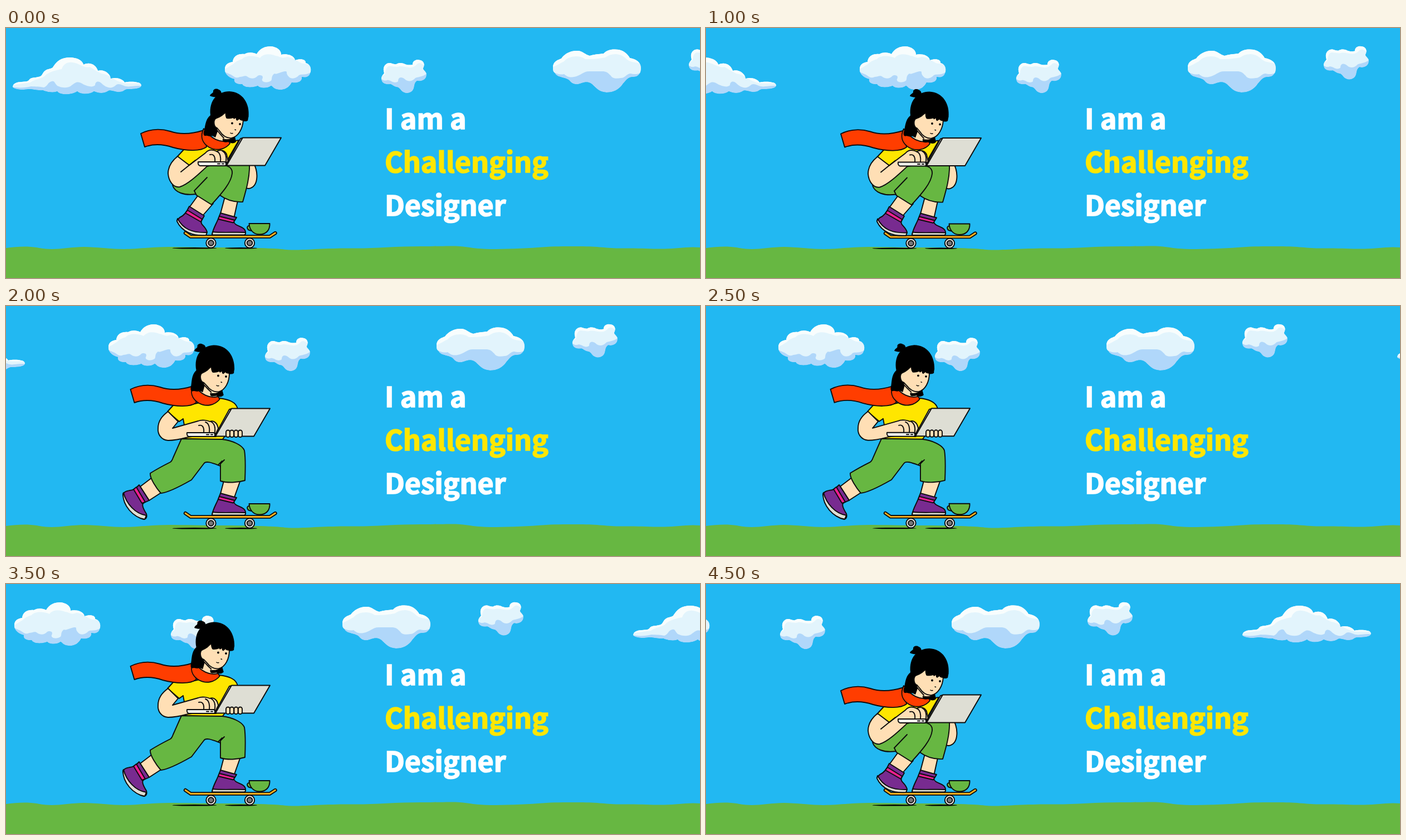
An HTML page that plays this animation: 1246 px wide and 450 px high, repeating every 5000 ms.

```html
<!DOCTYPE html>
<html lang="en">
<head>
<meta charset="utf-8">
<title>Challenging Designer</title>
<style>
  html, body { margin: 0; width: 100%; height: 100%; overflow: hidden; background: #22b8f2; }
  svg { display: block; width: 100%; height: 100%; }
  text {
    font: 700 50px "Noto Sans CJK KR", "Noto Sans CJK JP", "Noto Sans CJK SC", "Noto Sans CJK", sans-serif;
    fill: #fff; stroke: #fff; stroke-width: 1.7;
  }
  text.accent { fill: #ffe600; stroke: #ffe600; }
  .ink { stroke: #0c0c0c; stroke-width: 1.9; stroke-linejoin: round; stroke-linecap: round; }
</style>
</head>
<body>
<svg id="stage" viewBox="0 0 1246 450" xmlns="http://www.w3.org/2000/svg"></svg>
<script>
const GREEN = '#67b742', SKIN = '#ffdfb5', YELLOW = '#ffe600', RED = '#ff3d00';
const PURPLE = '#782b90', PINK = '#ec1e8f', GREY = '#deded4', INK = '#000';

const LOOP = 5000, HOLD = 500;
const cloudX = [393, 340, 276, 232, 184, 130, 89, 15, -67, -148];
const bob = [0, 3, 0.5, 1, 4, 3.8, 3.3, 2, 2, 2];
const isStanding = step => step >= 4 && step <= 7;

const shape = (d, fill) => `<path class="ink" d="${d}" fill="${fill}"/>`;
const line = d => shape(d, 'none');
const flat = (d, fill) => `<path d="${d}" fill="${fill}"/>`;
const move = (x, y, body) => `<g transform="translate(${x} ${y})">${body}</g>`;

// A cloud is an outline with two wavy lower edges: one for the body, one for the highlight.
function cloud(id, left, right, outline, bodyEdge, lightEdge) {
  const above = edge => `M${left} 20H${right}V${edge}L${left} 20Z`;
  return `<clipPath id="${id}"><path d="${outline}"/></clipPath>
    <g id="${id}-art" clip-path="url(#${id})">
      ${flat(outline, '#b0d7fa')}${flat(above(bodyEdge), '#e2f4fc')}${flat(above(lightEdge), '#f8fdfd')}
    </g>`;
}

const longCloud = cloud('long', 8, 246,
  `M12 106C12 100 20 97 28 97C36 96 38 97 41 94C45 88 52 90 58 88C66 87 64 82 70 77C75 73 80 74 84 71
   C90 62 96 54 113 53C130 53 138 60 139 66C150 60 162 66 165 77C176 74 187 82 188 91C198 88 210 92 213 98
   C222 96 232 97 236 98C243 99 244 103 242 106C238 110 226 110 220 110C212 110 212 115 204 115
   C196 116 190 111 184 113C176 119 164 117 158 114C150 120 134 120 128 114C118 121 96 121 92 114
   C84 118 70 114 66 112C56 113 48 110 40 110C30 112 14 111 12 106Z`,
  `105C230 102 222 108 212 104C203 100 200 100 196 104C188 111 178 106 172 100C166 94 160 96 160 103
   C155 108 145 104 140 102C128 94 125 98 118 103C112 109 100 108 92 104C86 98 88 95 82 96
   C74 98 76 104 68 107C60 105 55 106 45 105C35 108 20 108 8 106`,
  `100C230 98 215 102 205 97C190 92 186 84 172 82C165 80 158 74 150 70C142 72 138 68 132 66
   C115 58 104 62 100 74C90 76 80 78 72 84C66 92 50 92 44 98C30 100 20 101 8 104`);

const puffCloud = cloud('puff', 390, 550,
  `M393 74C393 65 400 62 407 61C408 50 418 46 428 47C436 43 444 44 450 47C456 36 466 33 475 33
   C487 34 494 40 494 48C502 46 517 48 519 58C530 54 539 57 538 63C547 65 549 74 546 82
   C544 88 538 90 531 88C533 97 522 100 513 98C508 108 500 112 490 111C480 110 480 106 476 104
   C468 110 455 108 452 104C446 107 428 109 424 101C415 102 408 98 410 92C402 90 392 84 393 74Z`,
  `78C540 86 530 82 526 85C520 92 512 92 508 88C500 80 508 78 500 78C490 80 486 84 482 82
   C474 88 480 94 474 96C466 100 458 96 460 92C464 84 454 84 452 86C446 92 440 92 434 88
   C430 84 425 88 420 88C412 92 408 86 404 84C398 82 395 80 390 78`,
  `68C538 62 534 66 528 62C520 58 512 52 504 52C494 56 490 50 484 50C474 46 462 46 456 54
   C448 50 430 48 424 56C410 60 408 66 406 66L390 76`);

const smallCloud = cloud('small', 670, 758,
  `M674 93C673 86 678 84 679 81C675 70 682 62 690 63C694 64 698 66 701 65C706 62 710 63 714 64
   C720 67 724 67 730 66C730 58 738 56 744 58C751 60 752 67 749 72C748 76 755 78 755 84
   C755 92 748 97 738 95C732 99 734 106 731 111C727 118 717 119 711 114C707 110 707 107 700 106
   C694 104 694 102 690 101C682 102 675 100 674 93Z`,
  `80C750 88 740 88 735 90C728 98 720 96 716 92C708 86 704 90 704 96C696 102 690 92 684 94C678 96 674 92 670 88`,
  `68C750 70 749 64 743 63C737 63 736 70 728 71C722 72 712 68 706 69C698 72 690 66 685 70C681 74 682 78 680 84L670 88`);

const wideCloud = cloud('wide', 978, 1144,
  `M982 72C982 60 990 58 997 55C1003 46 1015 40 1027 41C1036 42 1040 48 1048 50C1058 47 1064 47 1073 46
   C1080 38 1092 38 1100 39C1110 41 1117 48 1120 54C1132 56 1140 62 1140 72C1140 82 1135 88 1127 88
   C1116 88 1114 94 1108 100C1100 112 1090 116 1078 116C1064 115 1060 108 1054 103
   C1048 96 1040 97 1034 99C1022 104 1016 100 1012 95C1006 88 990 90 986 82C982 78 982 76 982 72Z`,
  `76C1138 84 1128 84 1122 82C1114 82 1112 90 1104 90C1094 92 1088 90 1086 86C1080 80 1078 78 1070 78H1047
   C1036 78 1032 86 1020 88C1010 90 1006 86 1002 83C994 85 986 82 978 76`,
  `66C1130 60 1122 64 1112 54C1100 44 1086 46 1076 53C1060 56 1050 56 1040 56C1030 48 1010 50 1002 60C994 64 988 68 978 72`);

const clouds = longCloud + puffCloud + smallCloud + wideCloud +
  '<use href="#small-art" x="552" y="-24.5"/><use href="#long-art" x="1492" y="-14"/>';

const ground = flat(`M0 396C15 394 30 393 45 394S65 398 82 398S120 394 140 394S190 398 212 398S265 394 292 394
  S350 395 390 395S460 396 480 397S505 400 522 399.500S585 396 622 396.500S700 393 745 393S800 392 815 393
  S845 398 870 398S930 397 955 395S995 393 1030 393S1080 397 1110 396.500S1160 398 1182 397.500S1225 393 1246 395
  V450H0Z`, GREEN);

const wheel = x => `<circle class="ink" cx="${x}" cy="387" r="8.700" fill="#e6e6e0"/>
  <circle class="ink" cx="${x}" cy="387" r="4.800" fill="#77777a"/>`;
const deck = 'M322 369L331.500 375.500H473.500L483.500 369';
const board = `
  <ellipse cx="338.500" cy="396.300" rx="40" ry="1.200"/><ellipse cx="422" cy="396.300" rx="29" ry="1.200"/>
  ${wheel(368)}${wheel(437.5)}
  <g fill="none" stroke-linecap="round" stroke-linejoin="round">
    <path d="${deck}" stroke="#0c0c0c" stroke-width="6.400"/><path d="${deck}" stroke="#fbb01e" stroke-width="2.800"/>
  </g>
  ${shape('M438 356C431 355 431 364 441 365Z', GREEN)}
  ${shape('M436.500 352H473.500C474 364 467 371.500 455 371.500C443 371.500 437 362 436.500 352Z', GREEN)}`;

const frontShoe =
  shape('M382 341L409 348C410 358 429 356 430 367L429 372H370C371 362 378 352 382 341Z', PURPLE) +
  shape('M371 367C390 369 410 367 430 368C431 372 428 372.500 425 372.500H370Z', GREY) +
  shape('M383 338L411 346L408 350.500L381 344Z', PINK) +
  shape('M385 333L414 341L411 346L383 339Z', PURPLE);

const hair = `
  ${flat('M366 122C367 118 371 118 372 115C371 110 378 108 382 111C386 112 388 117 386 121C382 126 372 125 366 122Z', INK)}
  ${flat(`M367 157C364 130 380 114 401 114C425 115 438 136 435.500 160L432 168L427 168L400 150L379 180L380 186L376 197
    L370 194C366 197 362 193 359 194C355 195 354 191 355 187C358 178 357 165 367 157Z`, INK)}`;
const neck = flat('M374 176L372 196L385 209L404 207L402 190Z', SKIN);
const face =
  shape('M376 163C372 168 373 178 379 180L384 186C388 193 396 199 405 198C416 196 425 183 426 165L395 152Z', SKIN) +
  flat(`M376 164Q391 159 394 151Q393 159 396 163Q402 164 408 162L409 164L413 162Q412 165 415 167L419 164
    Q421 168 434 167C438 150 430 130 410 125L375 140L370 160Z`, INK) +
  line('M379 184Q385 192 391 198') +
  flat('M389 199Q400 203 411 195L413 205Q407 210 400 205Q390 207 389 203Z', INK);
const features = `<circle cx="406" cy="171.500" r="1.900"/><circle cx="420" cy="173" r="1.900"/>
  <path d="M411 183l1.500 .5M403 189q2 1.500 4 0.500" fill="none" stroke="#000" stroke-width="1.400" stroke-linecap="round"/>`;

const scarf =
  shape('M242 190C258 182 275 180 295 186C312 192 330 192 355 184L360 214C350 222 325 222 300 215C285 210 268 207 249 214Z', RED) +
  shape('M355 181C348 195 352 207 365 215C378 222 393 219 402 208Q401 205 399 203C385 207 368 200 355 181Z', RED);

const fingers = line('M366 228C373 226 376 232 375 241M378 222C385 224 386 234 385 241M388 221C395 225 396 232 395 240');
const laptop =
  shape('M345 241H394L396 248H348Q344 246 345 241Z', '#efefea') +
  shape('M421 199L425 198L397 248H394Z', '#efefea') +
  shape('M425 197.500H494L465 247.500H396Z', GREY) +
  line('M380 244.500h4M388 244.500h3');

const crouching = `
  ${shape('M436 246H446C453 262 453 286 436 289L428 288Z', SKIN)}
  ${shape('M393 304L384 338L409 343L416 311Z', SKIN)}
  ${shape('M345 301L329 323L352 339L372 316Z', SKIN)}
  ${shape('M395 246H437C438 270 430 295 425 313C408 314 395 309 384 301L403 272Z', GREEN)}
  ${shape('M338 293L342 301L369 318C385 300 404 280 406 262C407 252 400 248 390 247H362L299 283C303 296 320 302 341 299Z', GREEN)}
  ${line('M361 269L338 293')}
  ${shape('M329 321L356 338L351 347C348 354 358 356 361 367L359 373C340 374 322 372 307 346L312 341C320 338 325 330 329 321Z', PURPLE)}
  ${shape('M308 343C318 362 334 369 361 368L359 373C336 375 316 367 307 348Z', GREY)}
  ${shape('M326 328L352 344L350 349L322 333Z', PINK)}
  ${frontShoe}
  ${shape('M322 216L307 232L329 247L395 242L418 202L398 205Z', YELLOW)}
  ${shape(`M308 231L329 247L358 225C364 218 372 219 378 222C386 218 393 221 396 227L399 241L361 249
    C345 264 326 282 312 286C300 288 292 275 291 262C291 249 298 239 308 231Z`, SKIN)}
  ${line('M314 259L340 238')}
  ${fingers}${laptop}${neck}${scarf}${hair}${face}${features}`;

const tilt = body => `<g transform="translate(-26 -43.500) rotate(-4 401 150)">${body}</g>`;
const grip = [395, 402, 409.5, 417].map(x =>
  `<rect class="ink" x="${x}" y="223.500" width="7" height="12.500" rx="3.500" fill="${SKIN}"/>`).join('');
const standing = move(0, -4, `
  ${shape('M262 309L241 325L257 350L280 335Z', SKIN)}
  ${shape('M391 315L384 342L409 347L420 316Z', SKIN)}
  ${shape('M239 322L257 350L248 354C242 356 247 366 252 374C254 381 251 384 247 384C230 380 214 362 210 340C211 334 217 333 222 332C230 332 235 326 239 322Z', PURPLE)}
  ${shape('M211 336C216 356 232 374 252 377L249 384C228 380 210 360 210 338Z', GREY)}
  ${shape('M234 326L250 353L244 355L229 330Z', PINK)}
  ${move(0, 4, frontShoe)}
  ${shape('M290 190L301 178C312 181 322 178 334 177L383 166C398 168 414 172 416 186L400 225L388 241L315 239L320 214L318 203L311 208Z', YELLOW)}
  ${shape(`M315 239L300 273Q298 279 295 281Q275 291 259 301C258 310 270 328 278 337C290 336 312 325 333 313L355 284
    C359 277 374 284 385 288V315C398 319 416 318 429 314C430 290 430 272 428 260C424 250 406 242 388 240Z`, GREEN)}
  ${line('M385 290V284L392 277M381 286L388 279')}
  ${shape(`M291 190L309 208L299 220L345 207C352 204 362 206 366 208C374 205 380 212 381 221L377 229L327 236
    C312 240 300 242 291 242C278 241 272 230 273 220C273 207 281 197 291 190Z`, SKIN)}
  ${move(-20, -13, fingers + laptop)}${grip}
  ${tilt(neck)}${move(-18.5, -40, scarf)}${tilt(hair + face)}${move(-25, -46, features)}`);

document.getElementById('stage').innerHTML = `
  <rect width="1246" height="450" fill="#22b8f2"/>
  <g id="clouds">${clouds}</g>
  ${ground}
  <text x="680" y="182">I am a</text>
  <text x="680" y="260" class="accent">Challenging</text>
  <text x="680" y="338">Designer</text>
  <g id="rider">${board}<g id="crouching">${crouching}</g><g id="standing">${standing}</g></g>`;

const el = id => document.getElementById(id);
const sky = el('clouds'), rider = el('rider'), low = el('crouching'), tall = el('standing');

function draw(time) {
  const step = Math.floor((time % LOOP) / HOLD);
  const up = isStanding(step);
  sky.setAttribute('transform', `translate(${cloudX[step] - cloudX[0]} ${step === 1 ? -1 : 0})`);
  rider.setAttribute('transform', `translate(0 ${bob[step]})`);
  low.setAttribute('display', up ? 'none' : 'inline');
  tall.setAttribute('display', up ? 'inline' : 'none');
}

const start = performance.now();
function tick() {
  draw(performance.now() - start);
  requestAnimationFrame(tick);
}
tick();
</script>
</body>
</html>
```
